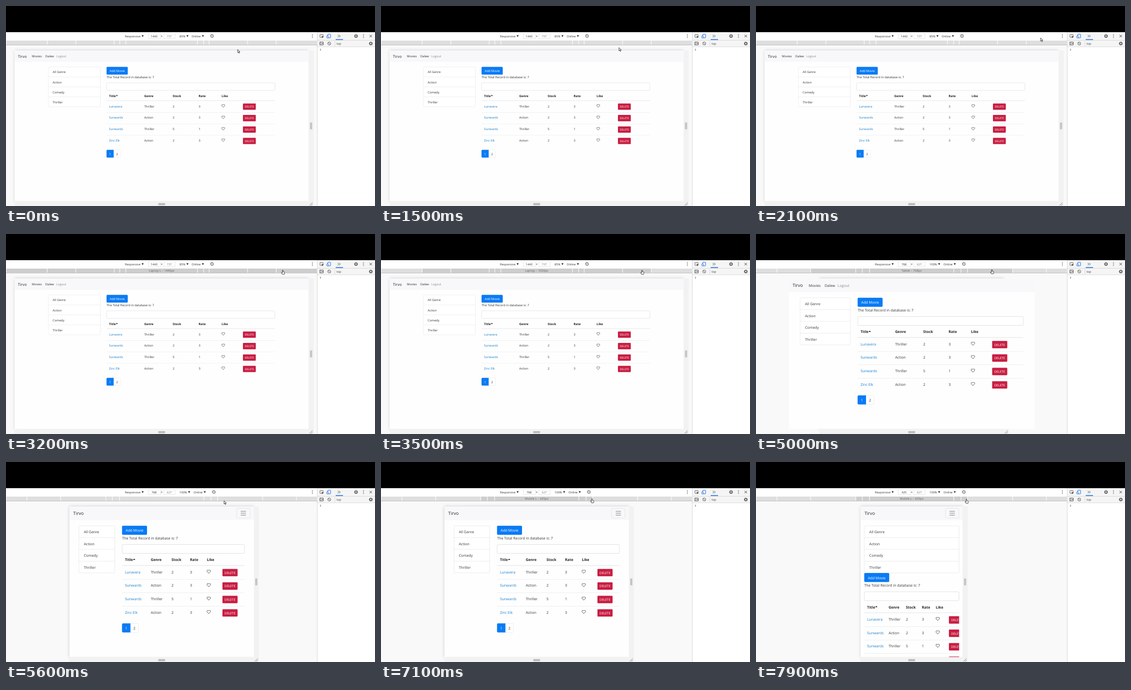
Write an HTML page with a canvas that moves like this. It is 704 px wide and 382 px high and loops after 8000 ms.

```html
<!DOCTYPE html>
<html lang="en">
<head>
<meta charset="utf-8">
<title>Responsive preview</title>
<style>
  html, body { margin: 0; width: 100%; height: 100%; overflow: hidden; background: #000; }
  canvas { display: block; }
</style>
</head>
<body>
<canvas id="stage" width="704" height="382"></canvas>
<script>
const ctx = document.getElementById('stage').getContext('2d');
const FONT = '"Open Sans", "Noto Sans", sans-serif';
const LOOP = 8000, STEP = 100;
const CENTER = 297, PAGE_TOP = 85, PAGE_BOTTOM = 372.5;
const PAGE_SCALE = 0.4583, RULER_SCALE = 0.502;

// Viewport states: the page layout may lag behind the chosen width.
const VIEWS = [
  { at: 0, width: 1440, height: 737, zoom: 0.85, page: 1440 },
  { at: 3900, width: 1024, height: 627, zoom: 1, page: 1024 },
  { at: 5000, width: 768, height: 627, zoom: 1, page: 1024 },
  { at: 5100, width: 768, height: 627, zoom: 1, page: 768 },
  { at: 7500, width: 425, height: 627, zoom: 1, page: 425 },
];

// Pointer path: time, x, y
const PATH = [
  [0, 442, 83], [1400, 442, 83], [1800, 490, 69], [2000, 490, 69],
  [2100, 543, 61], [2200, 541, 66], [2500, 538, 69], [3100, 538, 69],
  [3500, 498, 69], [4100, 498, 69], [4500, 450, 68], [5400, 450, 68],
  [5500, 432, 138], [5600, 416, 74], [5700, 424, 69], [5900, 424, 69],
  [6200, 431, 70], [6600, 409, 70], [6800, 409, 70], [7100, 402.5, 70],
  [7600, 402.5, 70], [7900, 401.5, 71], [8000, 401.5, 71],
];

const PRESETS = [
  [1440, 'Laptop L'], [1024, 'Laptop'], [768, 'Tablet'],
  [425, 'Mobile L'], [375, 'Mobile M'], [320, 'Mobile S'],
];

// Column starts after the title: genre, stock, rate, like, delete
const COLUMNS = {
  1440: [634.5, 774, 901, 1013.5, 1118],
  1024: [443, 560, 666, 759, 847],
  768: [338.5, 425, 502, 572, 637],
  425: [116.5, 188.5, 255, 313, 367.5],
};
const ROWS = [
  ['Lunavera', 'Thriller', 2, 3],
  ['Sunwards', 'Action', 2, 3],
  ['Sunwards', 'Thriller', 5, 1],
  ['Zinc Elk', 'Action', 2, 3],
];

function rect(x, y, w, h, color) {
  ctx.fillStyle = color;
  ctx.fillRect(x, y, w, h);
}

function box(x, y, w, h, radius, fill, stroke, lineWidth = 1) {
  ctx.beginPath();
  ctx.roundRect(x, y, w, h, radius);
  if (fill) { ctx.fillStyle = fill; ctx.fill(); }
  if (stroke) { ctx.strokeStyle = stroke; ctx.lineWidth = lineWidth; ctx.stroke(); }
}

function text(str, x, y, size, color, weight = 400, align = 'left') {
  ctx.font = `${weight} ${size}px ${FONT}`;
  ctx.textAlign = align;
  ctx.fillStyle = color;
  ctx.fillText(str, x, y);
  return ctx.measureText(str).width;
}

function stroke(path, color, width = 1) {
  ctx.strokeStyle = color;
  ctx.lineWidth = width;
  ctx.stroke(new Path2D(path));
}

function fill(path, color) {
  ctx.fillStyle = color;
  ctx.fill(new Path2D(path));
}

function at(x, y, draw) {
  ctx.save();
  ctx.translate(x, y);
  draw();
  ctx.restore();
}

function circle(x, y, r, color, width) {
  ctx.beginPath();
  ctx.arc(x, y, r, 0, Math.PI * 2);
  if (width) { ctx.strokeStyle = color; ctx.lineWidth = width; ctx.stroke(); }
  else { ctx.fillStyle = color; ctx.fill(); }
}

function pointerAt(t) {
  const i = PATH.findIndex(key => key[0] > t);
  const [t0, x0, y0] = PATH[i - 1], [t1, x1, y1] = PATH[i];
  const k = (t - t0) / (t1 - t0);
  return { x: x0 + (x1 - x0) * k, y: y0 + (y1 - y0) * k };
}

function hoveredPreset(pointer, zoom) {
  if (pointer.y < 65 || pointer.y >= 74) return null;
  const reach = Math.abs(pointer.x - CENTER) / (RULER_SCALE * zoom);
  return PRESETS.findLast(([width]) => width / 2 >= reach) || null;
}

function drawDots(x) {
  for (const y of [54.7, 57.5, 60.3]) circle(x, y, 0.75, '#444');
}

function drawGear(x, y) {
  for (let i = 0; i < 8; i++) {
    const a = i * Math.PI / 4, c = Math.cos(a), s = Math.sin(a);
    stroke(`M${x + 2 * c} ${y + 2 * s}L${x + 3.6 * c} ${y + 3.6 * s}`, '#555', 1.2);
  }
  circle(x, y, 2.1, '#555', 1.4);
}

function drawToolbar(view) {
  const dropdown = (label, x) => {
    const w = text(label, x, 59.7, 5.6, '#333');
    at(x + w + 2.2, 55.7, () => fill('M0 0h4l-2 3.8z', '#333'));
    return x + w + 2.2;
  };
  rect(0, 50, 594, 16, '#fff');
  dropdown('Responsive', 227);
  box(271.5, 53, 23.5, 9.5, 0, '#fff', '#e2e2e2', 0.8);
  box(301, 53, 21.5, 9.5, 0, '#fff', '#e2e2e2', 0.8);
  text(view.width, 282.5, 59.7, 5.6, '#333', 400, 'center');
  text('×', 297, 59.8, 6.5, '#444', 400, 'center');
  text(view.height, 311.5, 59.7, 5.6, '#777', 400, 'center');
  const shift = view.zoom < 1 ? 0 : 3.5;
  dropdown(view.zoom * 100 + '%', 331);
  dropdown('Online', 354.3 + shift);
  at(393 + shift, 57.3, () => {
    circle(0, 0, 3, '#666', 0.8);
    ctx.rotate(-Math.PI / 4);
    box(-1.3, -2.3, 2.6, 4.6, 0.4, '#fff', '#555', 0.8);
  });
  drawDots(584.5);
}

function drawRuler(zoom, hover) {
  rect(0, 65.5, 594, 9, '#fff');
  rect(1, 66.3, 592, 7.4, '#dedede');
  for (const [width] of PRESETS) {
    const half = width / 2 * RULER_SCALE * zoom;
    const left = Math.max(1, CENTER - half), right = Math.min(593, CENTER + half);
    rect(left, 66.3, right - left, 7.4, hover && width <= hover[0] ? '#cdcdcd' : '#dedede');
    if (half < 295) {
      rect(left - 0.5, 66, 1, 8, '#fff');
      rect(right - 0.5, 66, 1, 8, '#fff');
    }
  }
  if (hover) text(`${hover[1]} – ${hover[0]}px`, CENTER, 72, 5.75, '#666', 400, 'center');
}

function drawFrame(view) {
  const w = view.width * PAGE_SCALE * view.zoom, x = CENTER - w / 2, right = x + w;
  rect(0, 74.5, 594, 307.5, '#f9f9f9');
  ctx.save();
  ctx.shadowColor = 'rgba(0,0,0,.18)';
  ctx.shadowBlur = 6;
  rect(x, PAGE_TOP, w, PAGE_BOTTOM - PAGE_TOP, '#fff');
  ctx.restore();
  rect(right, PAGE_TOP, 9.5, 297, '#f2f2f2');
  rect(x, PAGE_BOTTOM + 0.5, w, 9.5, '#f2f2f2');
  stroke(`M${right + 3.4} 222.5v13m2.2 -13v13`, '#8a8a8a', 0.9);
  stroke('M290.5 377.4h13m-13 2.2h13', '#777', 0.9);
  stroke(`M${right + 1.5} 381l6 -6m-3 6l3 -3`, '#888', 0.9);
}

function drawHeart(x, y) {
  at(x, y, () => stroke('M8 14.5L1.8 8C-.8 5 1 .8 4.3 .8C6 .8 7.2 1.8 8 3C8.8 1.8 10 .8 11.7 .8C15 .8 16.8 5 14.2 8Z', '#333', 1.7));
}

function drawNavbar(w) {
  rect(0, 0, w, 56, '#f8f8fb');
  text('Tirvo', 16, 35.5, 18.7, '#222');
  if (w >= 992) {
    text('Movies', 84, 34.6, 15, '#333');
    text('Dalew', 150, 34.6, 15, '#333');
    text('Logout', 204, 34.6, 15, '#8b8b8b');
  } else {
    box(w - 72, 8, 56, 40, 4, null, '#dfdfe2', 1.4);
    for (const y of [20, 28, 36]) rect(w - 55, y - 1, 22, 2, '#777');
  }
}

function drawGenres(x, w) {
  box(x + 0.5, 80.5, w - 1, 196, 4, '#fff', '#dfdfdf', 1.2);
  ['All Genre', 'Action', 'Comedy', 'Thriller'].forEach((genre, i) => {
    if (i) rect(x, 80 + 49 * i, w, 1.2, '#dfdfdf');
    text(genre, x + 21, 111.6 + 49 * i, 15, '#333');
  });
}

function drawMovies(left, right, columns) {
  const w = right - left;
  box(left, 80, 104, 38, 4, '#0a7bf5');
  text('Add Movie', left + 52, 105.4, 15, '#fff', 500, 'center');
  text('The Total Record in database is: 7', left, 136.6, 15, '#333');
  box(left + 0.5, 158.5, w - 1, 37, 4, '#fff', '#ced4da', 1.4);

  ctx.save();
  ctx.beginPath();
  ctx.rect(left, 196, w, 300);
  ctx.clip();
  const [genreX, stockX, rateX, likeX, deleteX] = columns;
  const titleW = text('Title', left + 12, 227.6, 15, '#222', 700);
  at(left + 12 + titleW + 0.5, 217, () => fill('M0 5.5h9.5L4.75 0z', '#222'));
  ['Genre', 'Stock', 'Rate', 'Like'].forEach((name, i) => text(name, columns[i], 227.6, 15, '#222', 700));
  rect(left, 245, w, 2, '#dee2e6');
  ROWS.forEach(([title, genre, stock, rate], i) => {
    const top = 247 + 56 * i, base = top + 31.6;
    if (i) rect(left, top, w, 1.2, '#dee2e6');
    text(title, left + 12, base, 15, '#1780cb');
    text(genre, genreX, base, 15, '#333');
    text(stock, stockX, base, 15, '#333');
    text(rate, rateX, base, 15, '#333');
    drawHeart(likeX, top + 17);
    box(deleteX, top + 13, 63, 31, 3.2, '#c81e42');
    text('DELETE', deleteX + 31.5, top + 33.7, 13, '#fff', 400, 'center');
  });
  ctx.restore();

  box(left + 0.5, 487.5, 68, 37, 4, '#fff', '#dee2e6', 1.2);
  box(left, 487, 35, 38, [4, 0, 0, 4], '#0a7bf5');
  text('1', left + 17.5, 512.4, 15, '#fff', 400, 'center');
  text('2', left + 51.5, 512.4, 15, '#333', 400, 'center');
}

function drawPage(w, zoom) {
  const scale = PAGE_SCALE * zoom, h = (PAGE_BOTTOM - PAGE_TOP) / scale;
  const container = w >= 1200 ? 1140 : w >= 992 ? 960 : w >= 768 ? 720 : w;
  const stacked = w < 768;
  const edge = (w - container) / 2, left = edge + 15, right = w - left;
  const side = stacked ? 0 : container / 4;
  ctx.save();
  ctx.translate(CENTER - w * scale / 2, PAGE_TOP);
  ctx.scale(scale, scale);
  ctx.beginPath();
  ctx.rect(0, 0, w, h);
  ctx.clip();
  rect(0, 0, w, h, '#fefefe');
  drawNavbar(w);
  drawGenres(left, stacked ? right - left : side - 30);
  ctx.translate(0, stacked ? 197 : 0);
  drawMovies(left + side, right, COLUMNS[w]);
  ctx.restore();
}

function drawConsole() {
  rect(594, 50, 110, 332, '#fff');
  rect(594, 50, 110, 28, '#f5f5f5');
  rect(593.5, 50, 0.8, 332, '#cfcfcf');
  rect(594, 65, 110, 0.7, '#d0d0d0');
  rect(594, 77.6, 110, 0.7, '#d0d0d0');
  // inspect and device toggles
  box(599, 54.5, 6, 5.5, 0.6, null, '#666', 0.9);
  fill('M601.8 57l4.5 1.8l-1.8 .7l-.7 1.8z', '#444');
  box(613.8, 54, 5.4, 6.8, 0.6, null, '#1a73e8', 1);
  box(612, 57, 2.8, 4, 0.4, '#f5f5f5', '#1a73e8', 0.9);
  stroke('M633 55.3l2 2.2l-2 2.2m2.8 -4.4l2 2.2l-2 2.2', '#444', 0.9);
  rect(629, 63.3, 14, 1.5, '#1a73e8');
  drawGear(667.8, 57.5);
  drawDots(682);
  stroke('M693.6 55.2l4.6 4.6m0 -4.6l-4.6 4.6', '#444', 1);
  // console bar
  box(598.5, 68.8, 7, 5.6, 0.4, null, '#555', 0.9);
  stroke('M600.6 68.8v5.6', '#555', 0.8);
  fill('M604.4 70l-2.4 1.6l2.4 1.6z', '#555');
  circle(616.7, 71.6, 2.9, '#555', 0.9);
  stroke('M614.7 69.6l4 4', '#555', 0.9);
  rect(627, 67, 0.7, 10, '#d0d0d0');
  text('top', 630.5, 73.8, 5.8, '#444');
  drawGear(696, 71.7);
  stroke('M599 81.6l2 1.8l-2 1.8', '#555', 0.9);
}

function drawPointer({ x, y }, hand) {
  const path = new Path2D(hand
    ? 'M-.7 .6C-.7 -.3 .7 -.3 .7 .6V3L3 3.5Q3.7 3.7 3.6 4.6L3 8H-.8L-2.7 5.2Q-2.6 4.2 -1.6 4.7L-.7 5.4Z'
    : 'M0 0V6L1.4 4.8L2.4 7.2L3.5 6.7L2.5 4.4H4.4Z');
  at(x, y, () => {
    ctx.lineJoin = 'round';
    ctx.fillStyle = '#fff';
    ctx.fill(path);
    ctx.strokeStyle = '#222';
    ctx.lineWidth = 0.8;
    ctx.stroke(path);
  });
}

function draw() {
  const t = Math.floor(performance.now() % LOOP / STEP) * STEP;
  const view = VIEWS.findLast(v => v.at <= t);
  const pointer = pointerAt(t);
  const hover = hoveredPreset(pointer, view.zoom);
  ctx.textRendering = 'geometricPrecision';
  rect(0, 0, 704, 382, '#000');
  drawFrame(view);
  drawPage(view.page, view.zoom);
  drawToolbar(view);
  drawRuler(view.zoom, hover);
  drawConsole();
  drawPointer(pointer, hover);
  requestAnimationFrame(draw);
}
draw();
</script>
</body>
</html>
```
